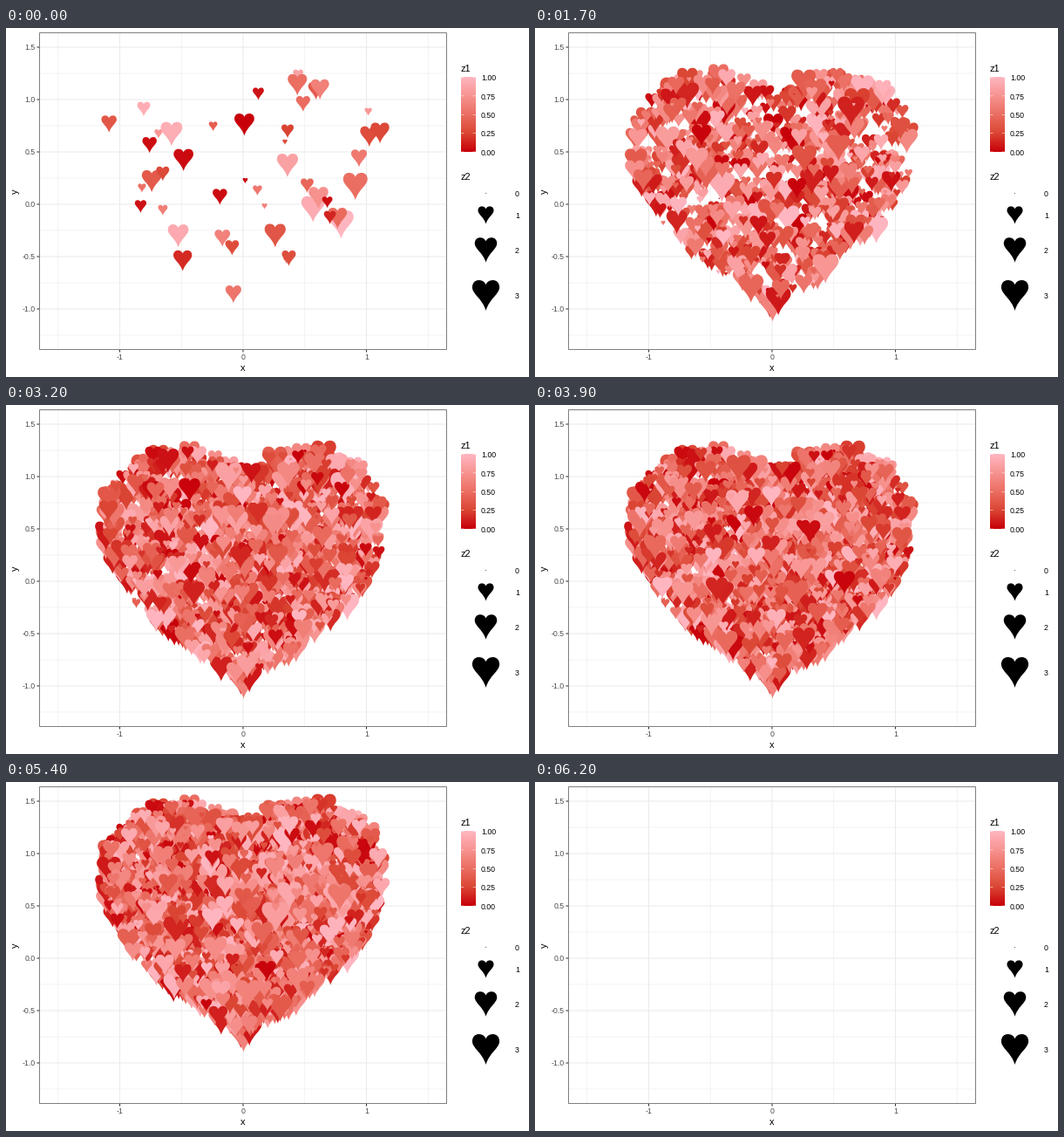
A matplotlib script that plays this animation: 600x400 px, repeating every 7500 ms.

```python
import numpy as np
import matplotlib.pyplot as plt
from matplotlib.animation import FuncAnimation
from matplotlib.colors import LinearSegmentedColormap
from matplotlib.patches import Rectangle
from matplotlib.path import Path

W, H, DPI = 600, 400, 100
PT = 72 / DPI
FRAMES, STEP = 75, 100
FIRST, PER_STEP, LAST_ADD, CLEAR = 47, 46, 53, 62
LIFT_START, LIFT_RATE = 48.4, 0.154
LEFT, RIGHT, TOP, BOTTOM = 38.5, 505.5, 5.5, 368.5
GREY = "#4D4D4D"

plt.rcParams["font.family"] = "Liberation Sans"
SHADES = LinearSegmentedColormap.from_list(
    "hearts", ["#C8000A", "#DB4634", "#EB6E62", "#F79390", "#FFB6C1"])

# Largest opening hearts: x, y, size, shade
KEY_HEARTS = [
    (.01, .76, 1.6, 0), (.44, 1.14, 1.5, .5), (1.11, .68, 1.4, .27),
    (-.58, .67, 1.9, .93), (.36, .37, 1.8, .85), (.91, .17, 2.4, .5),
    (.26, -.30, 1.8, .35), (-.49, -.54, 1.4, .15),
]


def px(x):
    return 272 + 141.5 * x


def py(y):
    return 202 - 120 * y


def count(step):
    return FIRST + PER_STEP * min(step, LAST_ADD)


def heart_path():
    half = [(0, .39), (.04, .50), (.13, .56), (.26, .56), (.41, .56),
            (.5, .45), (.5, .30), (.5, .04), (.13, -.11), (0, -.56)]
    mirror = [(-x, y) for x, y in half[-2::-1]]
    return Path(half + mirror, [Path.MOVETO] + [Path.CURVE4] * 18)


def area(z):
    """Marker area for size z: the heart is 18 px wide at z = 1."""
    return (18 * 1.12 * PT) ** 2 * np.asarray(z)


def make_hearts():
    """Rows of x, y, size, shade, scattered evenly inside a heart curve."""
    rng = np.random.default_rng(14)
    total = count(LAST_ADD)
    x = rng.uniform(-1.2, 1.2, total * 3)
    y = rng.uniform(-1.05, 1.3, total * 3)
    inside = (x**2 + y**2 - 1) ** 3 < x**2 * y**3
    size = np.abs(rng.normal(size=total))
    shade = rng.uniform(size=total)
    hearts = np.column_stack([x[inside][:total], y[inside][:total],
                              size, shade])
    hearts[FIRST - len(KEY_HEARTS):FIRST] = KEY_HEARTS
    return hearts


fig = plt.figure(figsize=(W / DPI, H / DPI), dpi=DPI, facecolor="white")
ax = fig.add_axes([0, 0, 1, 1])
ax.axis("off")


def line(x0, y0, x1, y1, color, width=1.0, z=1):
    ax.plot([x0, x1], [y0, y1], color=color, lw=width * PT, zorder=z,
            solid_capstyle="butt", snap=False)


def label(x, y, text, size=8.8, color="black", ha="left"):
    ax.text(x, y + .36 * size, text, fontsize=size * PT, color=color,
            ha=ha, va="baseline")


def panel_rect(**style):
    return Rectangle((LEFT, TOP), RIGHT - LEFT, BOTTOM - TOP, **style)


def draw_panel():
    for x in np.arange(-1.5, 2):
        line(px(x), TOP, px(x), BOTTOM, "#EBEBEB", .53)
    for y in np.arange(-1.25, 1.5, .5):
        line(LEFT, py(y), RIGHT, py(y), "#EBEBEB", .53)
    for x in (-1, 0, 1):
        line(px(x), TOP, px(x), BOTTOM, "#EBEBEB", 1.07)
        line(px(x), BOTTOM, px(x), BOTTOM + 3, "#333333", 1.07)
        label(px(x), 377, str(x), color=GREY, ha="center")
    for y in np.arange(-1, 1.6, .5):
        line(LEFT, py(y), RIGHT, py(y), "#EBEBEB", 1.07)
        line(LEFT - 3, py(y), LEFT, py(y), "#333333", 1.07)
        label(34, py(y) + .3, f"{y:.1f}", color=GREY, ha="right")
    ax.add_patch(panel_rect(fill=False, ec="#7F7F7F", lw=PT, zorder=5,
                            snap=False))
    label(272, 389, "x", 11, ha="center")
    ax.text(11, 187, "y", fontsize=11 * PT, rotation=90,
            ha="center", va="center")


def draw_legend(marker):
    label(521.5, 46, "z1", 11)
    ax.imshow(np.linspace(1, 0, 86)[:, None], cmap=SHADES, aspect="auto",
              extent=(522, 539, 142, 56), interpolation="nearest", zorder=2)
    for v in np.linspace(0, 1, 5):
        y = 142 - 85.5 * v
        line(522, y, 525.4, y, "white", .5, 3)
        line(535.6, y, 539, y, "white", .5, 3)
        label(545, y + .6, f"{v:.2f}")

    label(521.5, 170, "z2", 11)
    for z, y in enumerate((189, 214, 254, 306)):
        ax.scatter([550.3], [y], s=area(max(z, .003)), marker=marker,
                   c="black", linewidths=0)
        label(584, y + .4, str(z))


marker = heart_path()
draw_panel()
draw_legend(marker)
ax.set_xlim(0, W)
ax.set_ylim(H, 0)

hearts = make_hearts()
spots = np.column_stack([px(hearts[:, 0]), py(hearts[:, 1])])
sizes = area(hearts[:, 2])
colors = SHADES(hearts[:, 3])
cloud = ax.scatter([], [], marker=marker, linewidths=0, zorder=4)
cloud.set_clip_path(panel_rect(transform=ax.transData))


def update(step):
    n = count(step) if step < CLEAR else 0
    lift = LIFT_RATE * max(0, step - LIFT_START) ** 3
    cloud.set_offsets(spots[:n] - (0, lift))
    cloud.set_sizes(sizes[:n], DPI)
    cloud.set_facecolor(colors[:n])
    return [cloud]


def reset():
    return update(0)


anim = FuncAnimation(fig, update, frames=FRAMES, init_func=reset,
                     interval=STEP, repeat=True, repeat_delay=0, blit=False)
plt.show()
```
